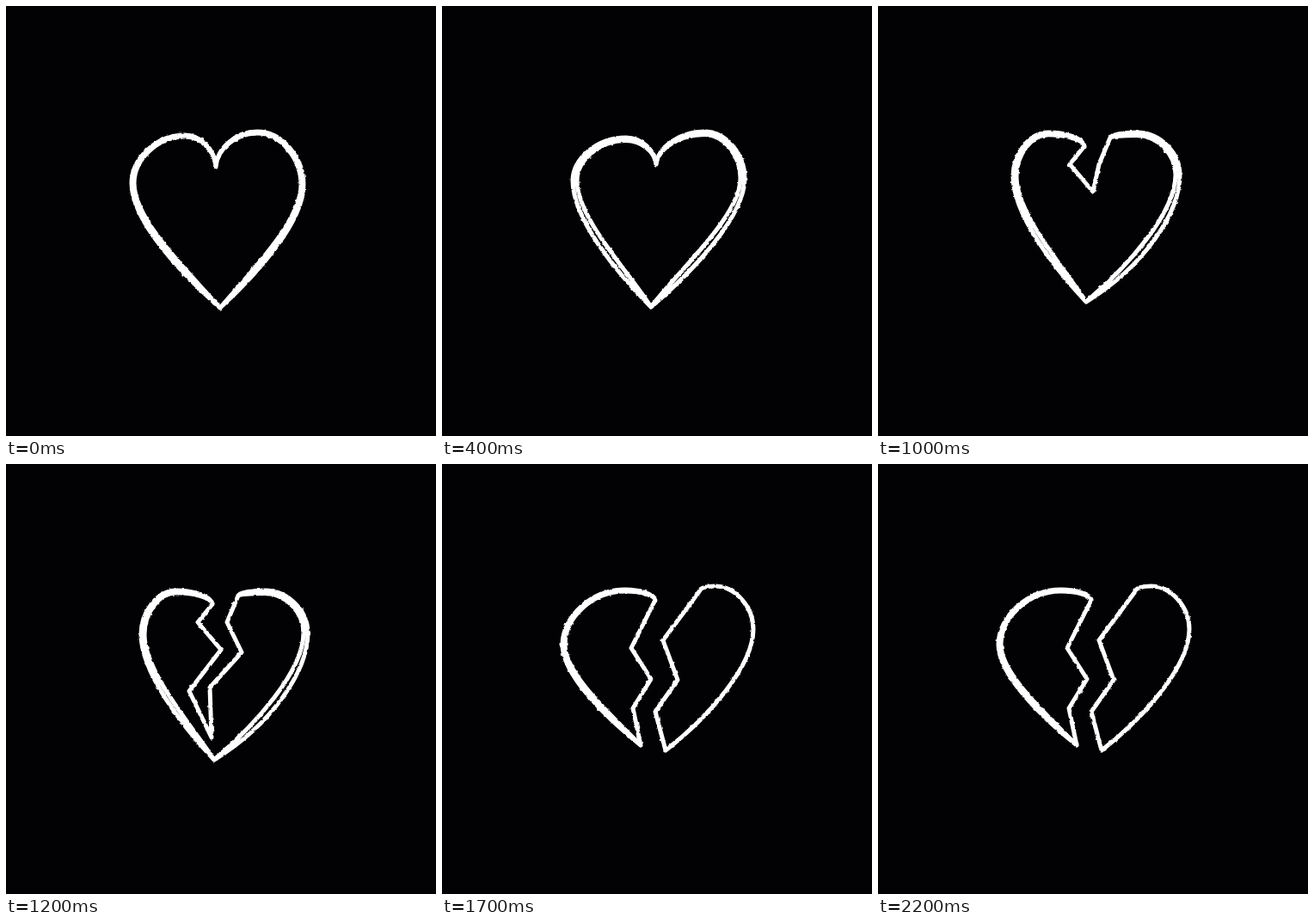
Write an HTML page that moves like this. It is 500 by 500 pixels and loops after 2300 ms.

```html
<!DOCTYPE html>
<html lang="en">
<head>
<meta charset="utf-8">
<title>Breaking heart</title>
<style>
  html, body { margin: 0; width: 100%; height: 100%; overflow: hidden; background: #020104; }
  svg { display: block; width: 100vw; height: 100vh; }
  path { fill: none; stroke: #fff; stroke-width: 5; stroke-linecap: round; stroke-linejoin: round; }
</style>
</head>
<body>
<svg viewBox="0 0 500 500">
  <filter id="chalk" filterUnits="userSpaceOnUse" x="0" y="0" width="500" height="500" color-interpolation-filters="sRGB">
    <feTurbulence id="grain" type="fractalNoise" baseFrequency=".25" numOctaves="1"/>
    <feDisplacementMap in="SourceGraphic" scale="3" xChannelSelector="R" yChannelSelector="G"/>
  </filter>
  <g filter="url(#chalk)"><path id="ink"/></g>
</svg>
<script>
const STEP = 100;
const ink = document.getElementById('ink');
const grain = document.getElementById('grain');

const mix = (a, b, t) => a + (b - a) * t;
const line = points => 'M' + points.join('L');

// One side of the heart: from the inner edge over the top and the flank down to the tip.
function lobe(edge, top, side, tip, bulge) {
  const toward = (a, b, tx, ty) => [mix(a[0], b[0], tx), mix(a[1], b[1], ty)];
  return `M${edge}` +
    `C${toward(edge, top, .03, .55)} ${toward(top, edge, .5, 0)} ${top}` +
    `C${toward(top, side, .55, 0)} ${toward(side, top, 0, .5)} ${side}` +
    `C${toward(side, tip, 0, .3)} ${toward(tip, side, bulge, .28)} ${tip}`;
}

// The pen goes round twice; the second pass runs inside the first by the gap.
function half(edge, top, side, tip, gap = 0, bulge = .45) {
  const first = lobe(edge, top, side, tip, bulge);
  if (!gap) return first;
  const inward = gap * Math.sign(tip[0] - side[0]);
  return first + lobe(edge, [top[0], top[1] + gap * .7], [side[0] + inward, side[1]], tip, bulge - gap * .03);
}

const whole = (notch, tip, left, right, gap) =>
  half(notch, ...left, tip, gap) + half(notch, ...right, tip, gap);

// The crack runs down one zigzag and back up the other, meeting at the given tooth.
function cracked(depth) {
  const left = [[240, 163], [223, 184], [250, 216], [213, 264], [239, 318]];
  const right = [[270, 153], [257, 184], [274, 219], [237, 260]];
  const tip = [242, 344];
  return half(left[0], [198, 147], [157, 198], tip, 4) +
    half(right[0], [301, 147], [351, 196], tip, 5, .62) +
    line([...left.slice(0, depth + 1), ...right.slice(0, depth).reverse()]);
}

// Two loose pieces; the left teeth slide by the given drop.
function split(left, right, drop, gap) {
  const leftTeeth = [[220, 218], [243, 254], [222, 288]].map(([x, y]) => [x, y + drop]);
  const rightTeeth = [[257, 205], [274, 251], [248, 288]];
  return half(...left, gap) + line([left[0], ...leftTeeth, left[3]]) +
    half(...right, 0, .5) + line([right[0], ...rightTeeth, right[3]]);
}

const poses = {
  A: whole([244, 187], [249, 351], [[208, 150], [146, 206]], [[292, 146], [346, 208]], 3),
  B: whole([249, 185], [243, 350], [[214, 153], [152, 203]], [[305, 146], [352, 200]], 5),
  C: whole([247, 180], [248, 348], [[208, 149], [147, 207]], [[298, 146], [353, 204]], 5),
  D: split([[243, 167], [203, 149], [143, 205], [228, 341]],
           [[288, 151], [313, 144], [363, 201]  , [262, 326]], 5, 3),
  E: split([[243, 175], [203, 151], [139, 212], [238, 330]],
           [[286, 150], [318, 149], [366, 210], [265, 327]], 0, 0),
  F: split([[248, 158], [213, 146], [140, 210], [231, 327]],
           [[300, 147], [317, 142], [362, 192], [260, 333]], -4, 3)
};

const pick = names => [...names].map(name => poses[name]);
const reel = [...pick('ABCABABCA'), ...[1, 2, 3, 4].map(cracked), ...pick('EFDEFDEFDF')];

let shown = -1;
function draw() {
  const index = Math.floor(performance.now() / STEP) % reel.length;
  if (index !== shown) {
    ink.setAttribute('d', reel[index]);
    grain.setAttribute('seed', index + 1);
    shown = index;
  }
  requestAnimationFrame(draw);
}
draw();
</script>
</body>
</html>
```
